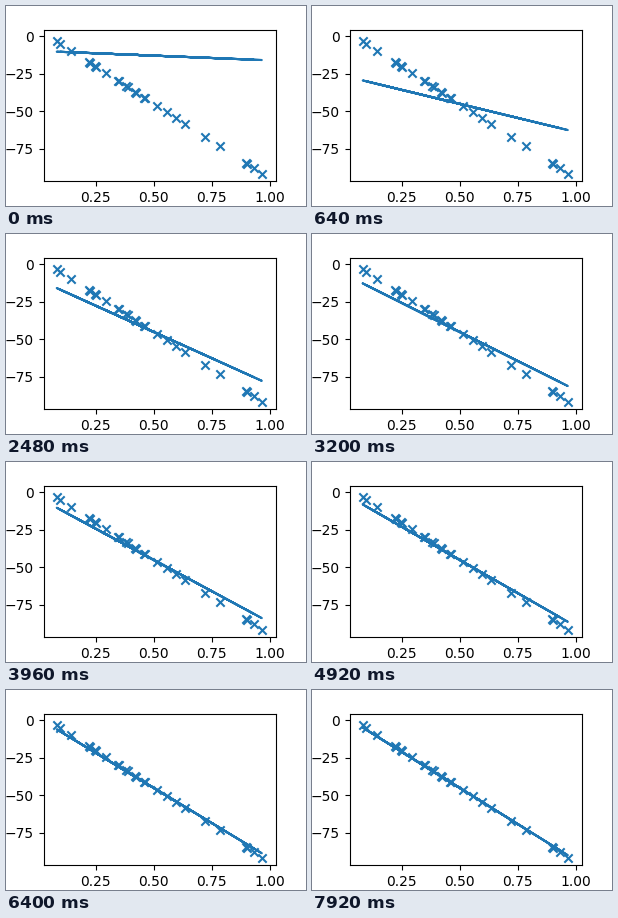
These frames come from a looping animation (300 px wide and 200 px high, 8000 ms). A matplotlib script:

```python
import random

import matplotlib.pyplot as plt
import numpy as np
from matplotlib.animation import FuncAnimation

FRAMES = 200
RATE = 0.295
SLOPE, OFFSET = -99.6, 4.65
TWIN_GAP = 0.005


def spread(*runs):
    """Evenly spaced values for each (first, last, count) run."""
    return np.concatenate([np.linspace(*run) for run in runs])


def descend(w, b, steps):
    """Gradient descent on the squared error of w * x + b."""
    fits = [(w, b)]
    for _ in range(steps):
        err = w * x + b - y
        w, b = w - RATE * np.mean(err * x), b - RATE * np.mean(err)
        fits.append((w, b))
    return fits


# Lone samples, plus close pairs that nearly overlap
singles = spread((0.082, 0.097, 2), (0.144, 0.293, 2), (0.515, 0.636, 4),
                 (0.720, 0.784, 2), (0.931, 0.966, 2))
twins = spread((0.222, 0.250, 2), (0.347, 0.461, 4), (0.901, 0.901, 1))
x = [*singles, *(twins - TWIN_GAP / 2), *(twins + TWIN_GAP / 2)]
random.Random(4).shuffle(x)
x = np.array(x)
y = SLOPE * x + OFFSET
fits = descend(-6.3, -9.8, FRAMES - 2)

fig, ax = plt.subplots(figsize=(3, 2), dpi=100, facecolor="white")
fig.subplots_adjust(left=0.125, right=0.9, bottom=0.125, top=0.88)
ax.scatter(x, y, marker="x", color="C0")
line, = ax.plot([], [], color="C0")
ax.set_xlim(0.025, 1.0272)
ax.set_ylim(-96.53, 4.13)
ax.set_xticks(np.arange(0.25, 1.01, 0.25))
ax.set_yticks(np.arange(-75, 1, 25))


def update(i):
    w, b = fits[min(i, len(fits) - 1)]
    line.set_data(x, w * x + b)
    return line,


anim = FuncAnimation(fig, update, frames=FRAMES, interval=40,
                     repeat=True, repeat_delay=0)
plt.show()
```
